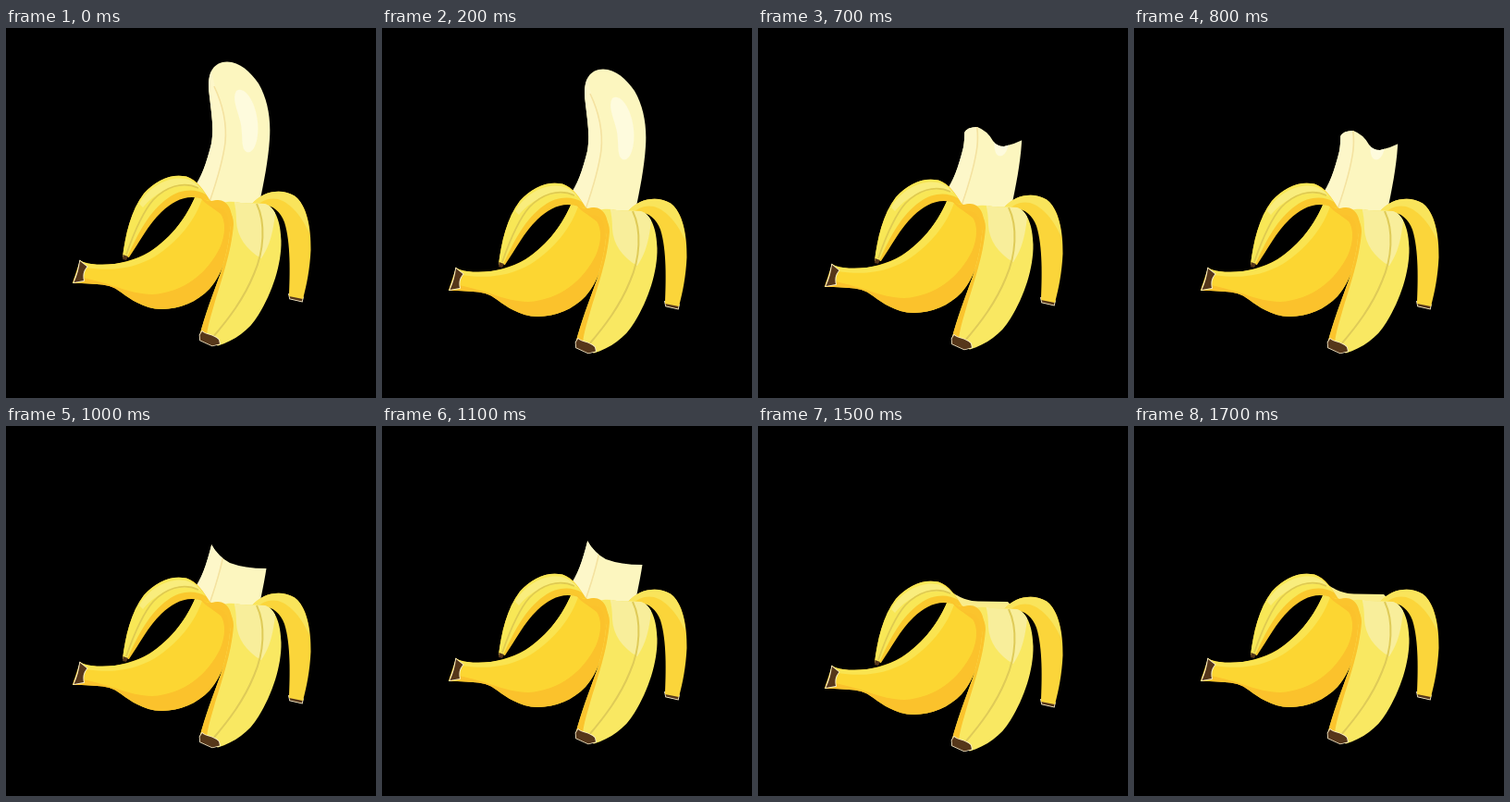
An HTML page for the animation above (1.8 s loop, 400 by 400 pixels).

```html
<!DOCTYPE html>
<html lang="en">
<head>
<meta charset="utf-8">
<title>Banana</title>
<style>
html, body { margin: 0; width: 100%; height: 100%; overflow: hidden; background: #000; }
svg { display: block; width: 100vw; height: 100vh; }
.tip { fill: #56371a; stroke: #fff3d0; stroke-width: 1.6; paint-order: stroke; }
</style>
</head>
<body>
<svg viewBox="0 0 400 400">
  <defs>
    <clipPath id="bite"><path id="edge"/></clipPath>
    <clipPath id="fleshShape"><path d="M202 174C211 163 217 145 222 125C225 108 222 92 220 74C217 53 221 37 239 36.500C253 37 264 47 273 60C283 77 286.500 98 285 120C283.500 143 279 166 273.500 192L230 194Z"/></clipPath>
    <clipPath id="bodyShape"><path d="M80 251C84 254 87 254 92 255C113 258 136 253 155 242C180 226 196 203 205 181L222 187C234 184 244 193 244 208C243 235 235 266 220 282C205 298 182 306 161 303.500C142 300 131 290 121 283.500C112 277 102 276.500 72 276Z"/></clipPath>
    <clipPath id="frontShape"><path d="M228 193C234 187 244 187 254 189L280 190C292 194 297 211 297.500 230C298 255 288 286 273 310C263 327 247 338 229 343.500L209 334C215 310 224 287 232 265C239 244 244 218 242 204C240 197 235 194 228 193Z"/></clipPath>
  </defs>
  <rect width="400" height="400" fill="#000"/>
  <g id="banana">
    <path fill="#f9ec8c" d="M201 167C211 171 219 181 238 181.500L270 182L277 189L250 197L217 191Z"/>
    <g id="flesh" clip-path="url(#bite)">
      <g clip-path="url(#fleshShape)">
        <rect x="200" y="30" width="90" height="170" fill="#fcf6bf"/>
        <path fill="#fdf7c9" d="M200 190V40H222C222 59 232 76 236 96C240 124 230 160 219 191Z"/>
        <path fill="none" stroke="#f4e2a0" stroke-width="1.600" d="M225 63C234 82 239 103 237 124C234 147 227 168 220 188"/>
        <path fill="#fefbdd" d="M249 68C258 62 270 80 272 101C274 121 268 137 260 134C253 130 257 115 253 100C250 88 244 76 249 68Z"/>
      </g>
    </g>

    <path class="tip" d="M306 288L321 291L320 295.500L307 292.500Z"/>
    <path fill="#fbd53a" d="M266 190C278 176 298 173 312 181.500C325 191 330 215 329.500 240C328.500 261 325 278 321 293L306 290C307 266 308 232 301 210C297 199 289 191 276 191Z"/>
    <path fill="#f9e45b" d="M266 190C278 176 298 173 312 181.500C321 188 327 204 328 222C320 204 308 189 294 185C284 183 277 187 272 191Z"/>

    <g clip-path="url(#bodyShape)">
      <rect x="70" y="175" width="180" height="132" fill="#fcd632"/>
      <path fill="#fbc22c" d="M70 268C110 273 132 288 158 288C193 286 218 264 231 238C237 225 238 209 232 201L217 190L224 183L252 191V308H70Z"/>
      <path fill="#fae450" d="M78 250C110 260 136 254 156 242C179 226 195 205 204 180L213 182C205 208 186 231 161 247C137 261 112 263 86 259Z"/>
    </g>
    <path class="tip" d="M80 252L87.500 258C83 263 83 268 84 273L73.500 275C77 267 79 260 80 252Z"/>

    <path fill="#fac82d" d="M126 248C129 224 135 197 149 179C162 164.500 178 157 195 160.500C207 164 214 176 221 187L207 183.500C192 181 180 188 168 199C154 212 144 232 133 248Z"/>
    <path fill="#f8e756" d="M126 248C129 224 135 197 149 179C162 164.500 178 157 195 160.500C204 164 211 172 216 180C205 173 188 174 175 184C156 197 143 221 131 248Z"/>
    <path fill="#f9ed7d" d="M144 190C156 169 178 160 194 163C202 165 207 169 211 174C192 165 164 174 148 194Z"/>
    <path fill="none" stroke="#dfca50" stroke-width="1.800" d="M208 173C191 165 172 172 159 186C146 201 137 225 130 245"/>
    <path fill="#56371a" d="M126.500 245L132 247L130 251L126 250Z"/>

    <g clip-path="url(#frontShape)">
      <rect x="205" y="180" width="95" height="166" fill="#f9e862"/>
      <path fill="#f8ee9b" d="M246 185H293C290 205 290 229 276 249C260 240 250 226 249 209C249 200 248 193 246 185Z"/>
      <path fill="#fbc42d" d="M225 190C238 190 246 199 246 212C244 242 232 275 225 299C221 313 217 325 217 336H205C212 300 235 253 241 217C243 203 238 195 225 193Z"/>
      <path fill="none" stroke="#dfcb58" stroke-width="2" d="M271 190C281 211 279 241 268 266C257 293 241 314 223 335"/>
    </g>
    <path fill="#fbc42d" d="M207 179C216 189 221 188 228 186C239 185 246 197 244 212L240 219C242 205 237 194 230 194C222 195 214 190 207 179Z"/>
    <path class="tip" d="M212 328C216 332 224 331 230 337L231 341.500L223 343.500L210 337.500L209.500 332Z"/>
  </g>
</svg>
<script>
const STEP = 100, LOOP = 1800;
const drop = [0, 4, 8, 8, 4, 0];
// top outline of the flesh after each bite; the last bite leaves nothing
const bites = [
  "V20H300",
  "V67H220L223.5 61Q229 73 239 74Q246 73 247 68Q252 80 261 79Q272 78 273 70L279 74H300",
  "V109H223Q226 103 237 103Q248 107 254 118Q258 124 266 124Q276 122 286 117H300",
  "V124H222Q229 137 242 144Q258 150 281 150H300",
  "V152H213Q223 164 236 171Q250 177 277 167H300",
  null
];
const banana = document.getElementById("banana");
const flesh = document.getElementById("flesh");
const edge = document.getElementById("edge");

function draw(ms) {
  const step = Math.floor((ms % LOOP) / STEP);
  const top = bites[Math.floor(step / 3)];
  banana.setAttribute("transform", `translate(0 ${drop[step % 6]})`);
  flesh.setAttribute("display", top ? "inline" : "none");
  if (top) edge.setAttribute("d", `M200 220${top}V220Z`);
}

const start = performance.now();
function tick() {
  draw(performance.now() - start);
  requestAnimationFrame(tick);
}
tick();
</script>
</body>
</html>
```
